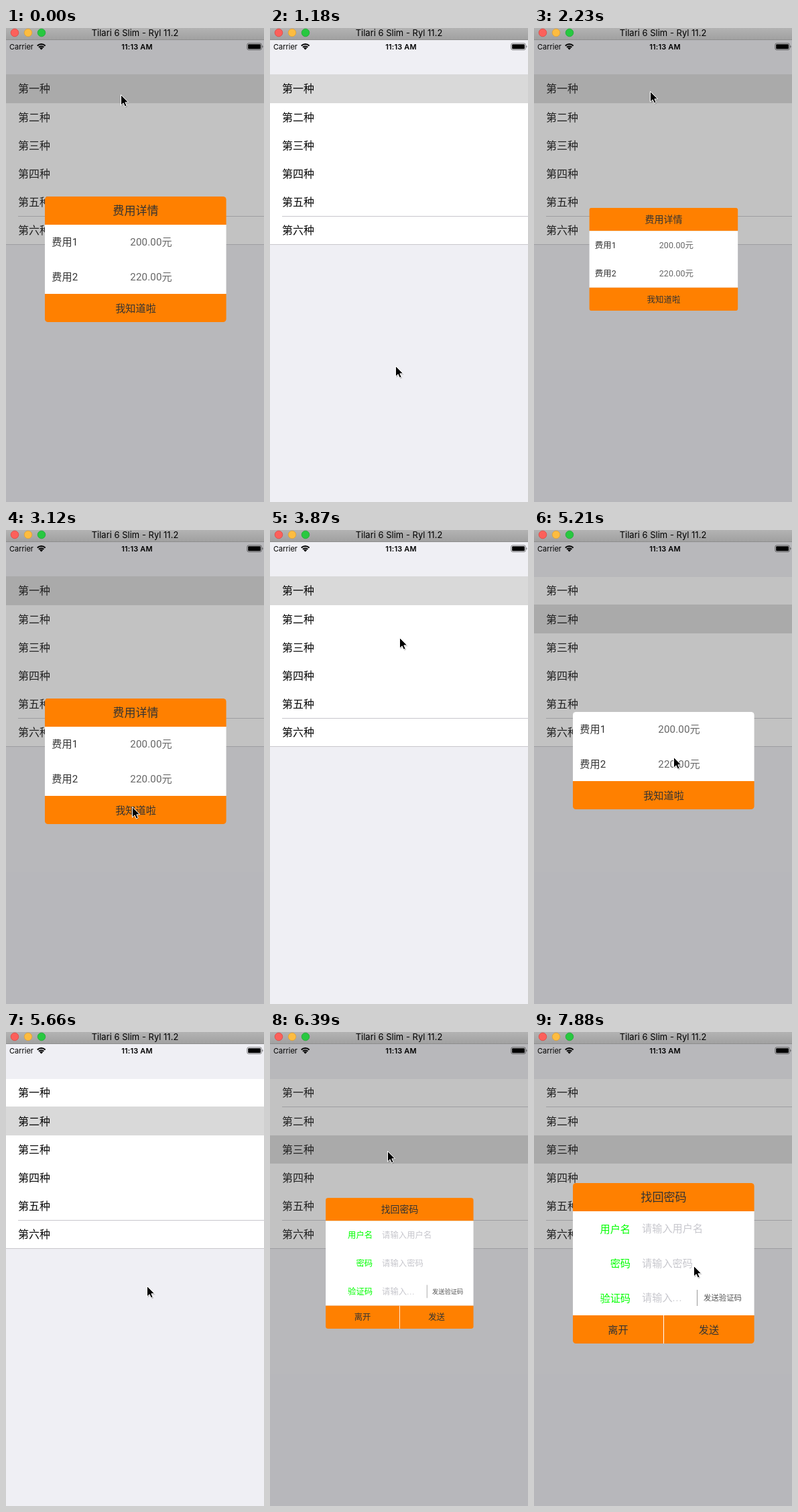
These frames come from a looping animation (385 px wide and 706 px high, 8 s). An HTML page:

```html
<!DOCTYPE html>
<html lang="zh-CN">
<head>
<meta charset="utf-8">
<title>Popup demo</title>
<style>
html, body { margin: 0; width: 100%; height: 100%; overflow: hidden; background: #efeff4; }
svg { display: block; width: 385px; height: 706px; font-family: Roboto, "Noto Sans CJK SC", "Noto Sans CJK", sans-serif; }
.latin { font-family: Inter, Roboto, sans-serif; }
</style>
</head>
<body>
<svg id="stage" viewBox="0 0 385 706">
  <defs>
    <linearGradient id="bar" x2="0" y2="1">
      <stop stop-color="#b3b3b3"/><stop offset="1" stop-color="#a1a1a1"/>
    </linearGradient>
    <clipPath id="round0"><rect x="58" y="251" width="270.6" height="187" rx="4.6"/></clipPath>
    <clipPath id="round1"><rect x="58" y="271" width="270.6" height="145" rx="4.6"/></clipPath>
    <clipPath id="round2"><rect x="58" y="225" width="270.6" height="239" rx="4.6"/></clipPath>
  </defs>
  <rect width="385" height="706" fill="#efeff4"/>
  <g id="list"></g>
  <rect id="dim" y="18" width="385" height="688" fill="rgb(80,80,80)" fill-opacity=".35"/>
  <g id="status" class="latin"></g>
  <g id="dialogs"></g>
  <g id="cursor">
    <path d="M1 1.5V17L4.6 13.7L7 19L9.7 17.8L7.4 12.7H12.3Z" fill="#000" opacity=".22"/>
    <path d="M0 0V15.6L3.6 12.3L6 17.6L8.7 16.4L6.4 11.3H11.2Z" fill="#000" stroke="#fff" stroke-width="1" stroke-linejoin="round"/>
  </g>
</svg>
<script>
const LOOP = 8000, STEP = 150, CX = 193.5, CY = 344.5;
const ORANGE = '#ff8000', INK = '#333';
const $ = id => document.getElementById(id);

const rect = (x, y, w, h, fill, extra = '') =>
  `<rect x="${x}" y="${y}" width="${w}" height="${h}" fill="${fill}" ${extra}/>`;
// y is the optical middle of the glyphs
const text = (x, y, size, str, fill = '#000', anchor = 'start', extra = '') =>
  `<text x="${x}" y="${y + size * 0.375}" font-size="${size}" fill="${fill}" text-anchor="${anchor}" ${extra}>${str}</text>`;

// --- table list
const rowTop = [69, 111, 154], rowHeight = [43, 43, 42];
$('list').innerHTML =
  rect(0, 70, 385, 252.5, '#fff') +
  rect(0, 69, 385, 43, '#d9d9d9', 'id="selected"') +
  rect(18, 111, 367, 1, '#c8c7cc', 'id="line"') +
  rect(18, 280, 367, 1, '#c8c7cc') + rect(0, 322, 385, 1, '#c8c7cc') +
  [...'一二三四五六'].map((n, i) => text(18, 90.4 + i * 42.2, 16, `第${n}种`, '#080808')).join('');

// --- window bar and status bar
const light = (x, fill, edge) =>
  `<circle cx="${x}" cy="7" r="5.8" fill="${fill}" stroke="${edge}" stroke-width=".8"/>`;
const arc = r => {
  const d = r * Math.SQRT1_2;
  return `<path d="M${52.7 - d} ${32.4 - d}A${r} ${r} 0 0 1 ${52.7 + d} ${32.4 - d}" fill="none" stroke="#000" stroke-width="2"/>`;
};
$('status').innerHTML =
  rect(0, 0, 385, 17, 'url(#bar)') + rect(0, 17, 385, 1, '#8e8e8e') +
  light(13, '#fc605b', '#dd4742') + light(33, '#fdbc40', '#dca035') + light(53, '#28c840', '#1ea935') +
  text(192.5, 7.4, 13, 'Tilari 6 Slim - Ryl 11.2', '#000', 'middle') +
  text(5, 28, 11, 'Carrier') +
  text(195.5, 28, 11, '11:13 AM', '#000', 'middle', 'font-weight="600" letter-spacing=".15"') +
  arc(8.4) + arc(5.2) +
  '<path d="M52.7 32.6L50.2 30.1A3.5 3.5 0 0 1 55.2 30.1Z"/>' +
  rect(359.8, 22.8, 21.6, 9.8, 'none', 'rx="2.4" stroke="#000" stroke-opacity=".5" stroke-width=".9"') +
  rect(361.2, 24.2, 18.8, 7, '#000', 'rx="1.2"') +
  '<path d="M382.3 26V29.5Q383.6 29 383.6 27.7Q383.6 26.4 382.3 26Z" opacity=".5"/>';

// --- dialogs
const band = y => rect(58, y, 271, 42, ORANGE);
const head = (y, str) => band(y) + text(CX, y + 20.6, 17.1, str, INK, 'middle');
const fees = y => rect(58, y, 271, 103, '#fff') +
  ['200.00元', '220.00元'].map((v, i) =>
    text(68.3, y + 25.4 + i * 51.5, 15.2, `费用${i + 1}`, INK) +
    text(185.3, y + 25.4 + i * 51.5, 15.2, v, '#666', 'start', 'letter-spacing=".1"')).join('');
const confirm = y => band(y) + text(CX, y + 21, 15.2, '我知道啦', INK, 'middle');
const field = (y, label, hint) =>
  text(144, y, 15.2, label, '#0f0', 'end') + text(161, y - 0.7, 15.2, hint, '#c7c7cd');

const content = [
  head(251, '费用详情') + fees(293) + confirm(396),
  fees(271) + confirm(374),
  head(225, '找回密码') + rect(58, 267, 271, 155, '#fff') +
    field(293, '用户名', '请输入用户名') + field(344.5, '密码', '请输入密码') +
    field(396, '验证码', '请输入<tspan letter-spacing="1">...</tspan>') +
    rect(243, 384, 1, 24, '#999') + text(253, 396, 11.4, '发送验证码', '#555') +
    band(422) + rect(193, 422, 1, 42, '#fff') +
    text(125.5, 443, 15.2, '离开', INK, 'middle') + text(261, 443, 15.2, '发送', INK, 'middle')
];
$('dialogs').innerHTML = content.map((c, i) => `<g><g clip-path="url(#round${i})">${c}</g></g>`).join('');
const dialogs = [...$('dialogs').children];

// open, close, dialog kind, sizes while growing
const popups = [
  [-1000, 1180, 0, [1]],
  [2220, 3270, 0, [0.82, 0.93, 0.98]],
  [4460, 5660, 1, [0.828, 0.935, 0.98]],
  [6390, LOOP, 2, [0.815, 0.93, 0.98]]
];

// --- pointer: start, end, steps, bend, target
const moves = [
  [150, 890, 6, [225, 330], [187, 503]],
  [1480, 2070, 5, [205, 300], [173, 94]],
  [2670, 3120, 4, [200, 250], [188, 412]],
  [3570, 4020, 4, [240, 260], [176, 115]],
  [4170, 4170, 1, [176, 120], [176, 124]],
  [4910, 5360, 4, [205, 250], [210, 378]],
  [5810, 6240, 4, [205, 260], [175, 177]],
  [6690, 6690, 1, [175, 178], [175, 180]],
  [6840, 7880, 8, [205, 270], [238, 348]]
];
const stops = [[-1, 171, 99]];
let from = [171, 99];
for (const [start, end, n, bend, to] of moves) {
  for (let i = 1; i <= n; i++) {
    const u = i / n, p = u * u * (3 - 2 * u), q = 1 - p;
    const [x, y] = [0, 1].map(k => q * q * from[k] + 2 * q * p * bend[k] + p * p * to[k]);
    stops.push([n > 1 ? start + (end - start) * (i - 1) / (n - 1) : start, x, y]);
  }
  from = to;
}

function draw(t) {
  const last = popups.filter(p => p[0] <= t + 0.5).pop();
  const [open, close, kind, sizes] = last;
  const shown = t + 0.5 < close;
  const row = popups.indexOf(last) < 2 ? 0 : kind;
  const scale = sizes[Math.floor((t - open + 0.5) / STEP)] ?? 1;

  $('selected').setAttribute('y', rowTop[row]);
  $('selected').setAttribute('height', rowHeight[row]);
  $('line').style.display = row === 2 ? '' : 'none';
  $('dim').style.display = shown ? '' : 'none';
  dialogs.forEach((d, i) => {
    d.style.display = shown && i === kind ? '' : 'none';
    d.setAttribute('transform', `translate(${CX} ${CY}) scale(${scale}) translate(${-CX} ${-CY})`);
  });

  const [, x, y] = stops.filter(s => s[0] <= t + 0.5).pop();
  $('cursor').setAttribute('transform', `translate(${Math.round(x) + 0.5} ${Math.round(y) + 0.5})`);
}

const t0 = performance.now();
function tick() {
  draw((performance.now() - t0) % LOOP);
  requestAnimationFrame(tick);
}
draw(0);
requestAnimationFrame(tick);
</script>
</body>
</html>
```
